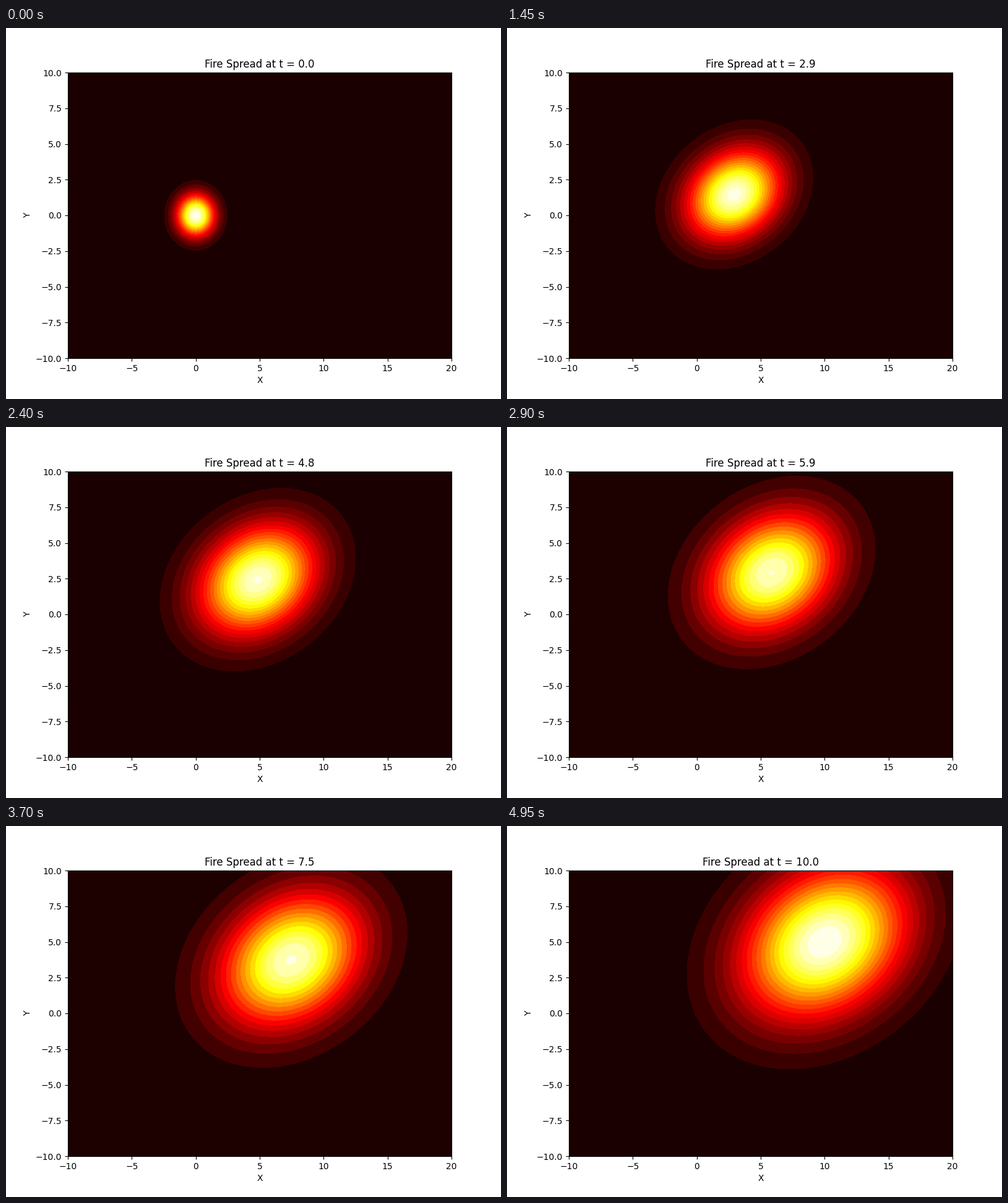
These frames come from a looping animation (800x600 px, 5 s). A matplotlib script:

```python
import numpy as np
import matplotlib.pyplot as plt
from matplotlib.animation import FuncAnimation

FRAMES = 100
INTERVAL = 50

WIND = np.array([1.0, 0.5])
D_ALONG, D_ACROSS = 1.0, 0.5

times = np.linspace(0, 10, FRAMES)
X, Y = np.meshgrid(np.linspace(-10, 20, 100), np.linspace(-10, 10, 100))

# Diffusion is stronger along the wind than across it.
along = np.outer(WIND, WIND) / (WIND @ WIND)
DIFFUSION = D_ACROSS * np.eye(2) + (D_ALONG - D_ACROSS) * along


def density(t):
    """Gaussian patch that drifts with the wind and spreads with time."""
    cov = np.eye(2) + 2 * DIFFUSION * t
    inv = np.linalg.inv(cov)
    dx, dy = X - WIND[0] * t, Y - WIND[1] * t
    q = inv[0, 0] * dx**2 + 2 * inv[0, 1] * dx * dy + inv[1, 1] * dy**2
    return np.exp(-q / 2) / (2 * np.pi * np.sqrt(np.linalg.det(cov)))


fig, ax = plt.subplots(figsize=(8, 6), dpi=100)


def update(frame):
    t = times[frame]
    ax.clear()
    ax.contourf(X, Y, density(t), levels=20, cmap="hot")
    ax.set_title(f"Fire Spread at t = {t:.1f}")
    ax.set_xlabel("X")
    ax.set_ylabel("Y")
    return []


anim = FuncAnimation(fig, update, frames=FRAMES, interval=INTERVAL,
                     init_func=lambda: update(0), repeat=True, repeat_delay=0)
plt.show()
```
